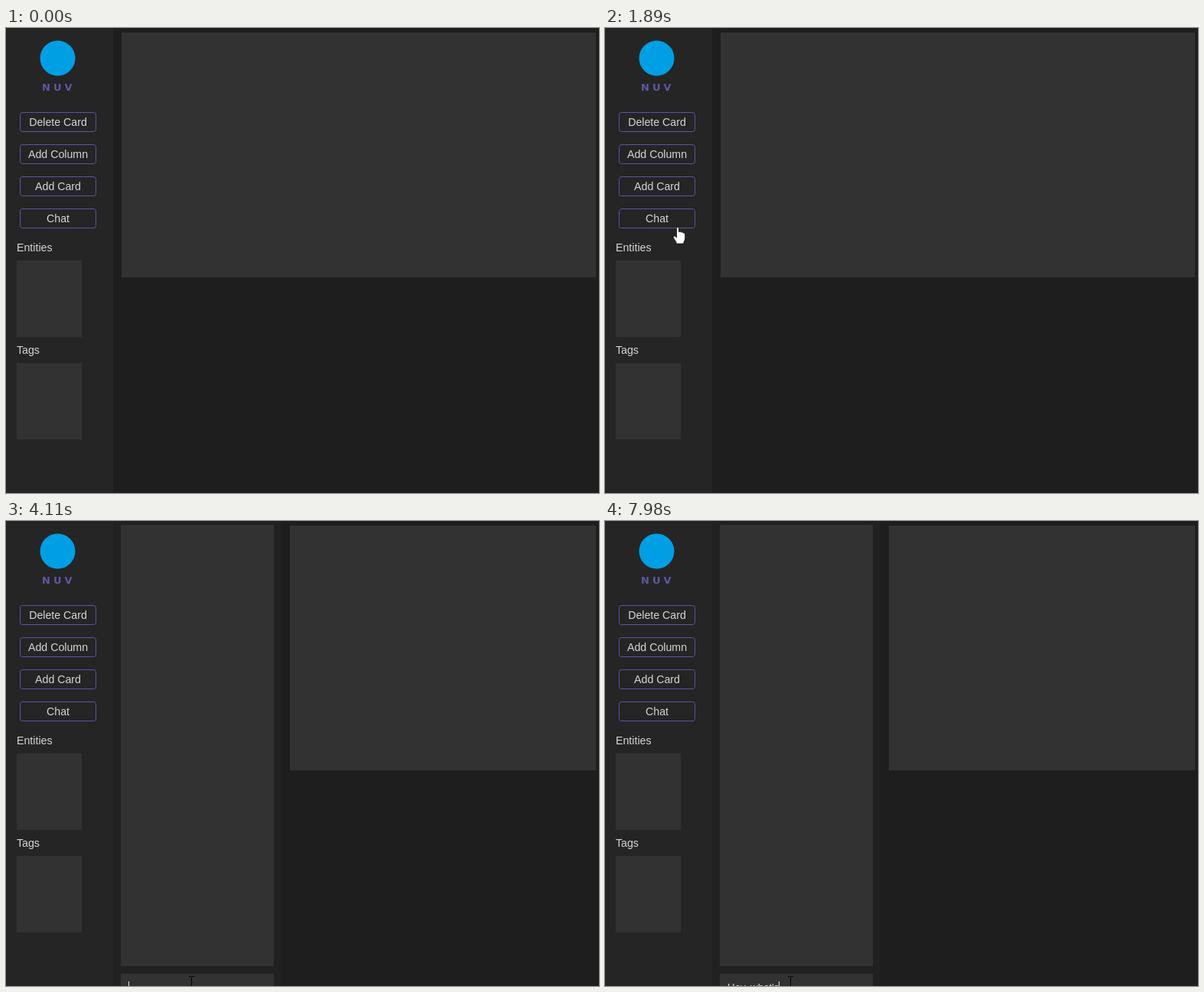
An HTML page that plays this animation: 775 px wide and 608 px high, repeating every 8000 ms.

```html
<!DOCTYPE html>
<html lang="en">
<head>
<meta charset="utf-8">
<title>Chat panel</title>
<style>
html, body { margin: 0; width: 100%; height: 100%; overflow: hidden; background: #1e1e1e; }
svg { display: block; width: 775px; height: 608px; }
text { font: 14.2px "Liberation Sans", Arial, sans-serif; fill: #d6d6d6; }
.mid { text-anchor: middle; }
.brand { font: bold 13px "DejaVu Sans", sans-serif; letter-spacing: 4px; fill: #5d57a5; }
#draft { font-size: 13.333px; white-space: pre; }
.panel { fill: #323232; }
.button { fill: none; stroke: #5b54a4; }
</style>
</head>
<body>
<svg viewBox="0 0 775 608">
  <rect width="775" height="608" fill="#1e1e1e"/>
  <rect width="140" height="608" fill="#252525"/>
  <circle cx="67.5" cy="39.5" r="23" fill="#009fe3"/>
  <text class="brand" x="47" y="82">NUV</text>
  <g id="buttons"></g>
  <text x="14" y="292">Entities</text>
  <rect class="panel" x="14" y="304" width="85" height="100"/>
  <text x="14" y="426">Tags</text>
  <rect class="panel" x="14" y="438" width="85" height="100"/>
  <rect class="panel" id="board" y="6" height="320"/>
  <g id="chat">
    <rect x="140" width="220" height="608" fill="#212121"/>
    <rect class="panel" x="150" y="5" width="200" height="577"/>
    <rect class="panel" x="150" y="592" width="200" height="16"/>
    <text id="draft" x="160" y="614" xml:space="preserve"></text>
    <rect id="caret" y="602" width="1" height="15" fill="#e0e0e0"/>
  </g>
  <g id="pointer">
    <path id="arrow" d="M.5 .5V16.5L4.3 12.9 6.8 18.5 9 17.5 6.6 12H11.5Z" fill="#fff" stroke="#000"/>
    <path id="hand" d="M-1.5 1.5Q0 -.6 1.5 1.5V6.5Q3.5 5.5 4.6 7Q6.6 6.3 7.4 8Q9.5 7.6 9.7 9.8V15Q9.5 18 8 19.5V22H-2V19.8L-5.8 14.2Q-6 11.5 -3.6 12L-1.5 14Z" fill="#fff" stroke="#111" stroke-width=".8"/>
    <path id="beam" d="M-3.5 -7.5H-.5M.5 -7.5H3.5M0 -7V7M-3.5 7.5H-.5M.5 7.5H3.5" fill="none" stroke="#000"/>
  </g>
</svg>
<script>
const LOOP = 8000;
const el = id => document.getElementById(id);
const show = (id, on) => el(id).setAttribute("display", on ? "inline" : "none");
const set = (id, attrs) => {
  for (const key in attrs) el(id).setAttribute(key, attrs[key]);
};

el("buttons").innerHTML = ["Delete Card", "Add Column", "Add Card", "Chat"].map((label, i) => {
  const y = 110 + 42 * i;
  return `<rect class="button" x="18.5" y="${y + .5}" width="99" height="25" rx="3"/>
    <text class="mid" x="68" y="${y + 18}">${label}</text>`;
}).join("");

// Pointer moves: start, end, number of positions, points along the path
const moves = [
  [500, 1200, 10, [[97, 511], [108, 420], [104, 335], [98, 285], [96, 270]]],
  [1690, 1890, 4, [[96, 268], [95, 260]]],
  [3130, 3620, 7, [[110, 241], [148, 221], [170, 270], [195, 390], [217, 526], [234, 580], [242.5, 600]]],
  [3870, 3871, 2, [[242.5, 603], [242.5, 603]]]
];

// Typing bursts: first key, last key, characters
const bursts = [[6730, 6730, "H"], [6980, 7050, "ey"], [7280, 7450, ", w"], [7650, 7980, "hat's"]];

// How many of n evenly spaced steps have happened by t
function stepsDone(t, start, end, n) {
  if (t < start) return 0;
  if (t >= end) return n;
  return 1 + Math.floor((t - start) / (end - start) * (n - 1));
}

function pointerAt(t) {
  const move = moves.filter(m => t >= m[0]).pop();
  if (!move) return null;
  const [start, end, n, pts] = move;
  const p = (stepsDone(t, start, end, n) - 1) / (n - 1) * (pts.length - 1);
  const i = Math.min(Math.floor(p), pts.length - 2);
  return pts[i].map((v, k) => v + (pts[i + 1][k] - v) * (p - i));
}

function drawPointer(t) {
  const pos = pointerAt(t);
  show("pointer", pos);
  if (!pos) return;
  const [x, y] = pos;
  const beam = x >= 150 && y >= 592;
  const hand = x < 118 && y >= 236 && y < 262;
  show("beam", beam);
  show("hand", hand);
  show("arrow", !beam && !hand);
  const place = beam ? [x, y] : pos.map(Math.round);
  set("pointer", { transform: `translate(${place})` });
}

function draw(t) {
  const open = t >= 2700;
  const left = open ? 371 : 151;
  show("chat", open);
  set("board", { x: left, width: 771 - left });

  const typed = bursts.map(([a, b, s]) => s.slice(0, stepsDone(t, a, b, s.length))).join("");
  el("draft").textContent = typed;
  show("caret", (t >= 4110 && t < 6230) || typed);
  set("caret", { x: 160 + (typed && open ? Math.round(el("draft").getComputedTextLength()) : 0) });

  drawPointer(t);
}

let began;
function tick(now) {
  began ??= now;
  draw((now - began) % LOOP);
  requestAnimationFrame(tick);
}
draw(0);
requestAnimationFrame(tick);
</script>
</body>
</html>
```
